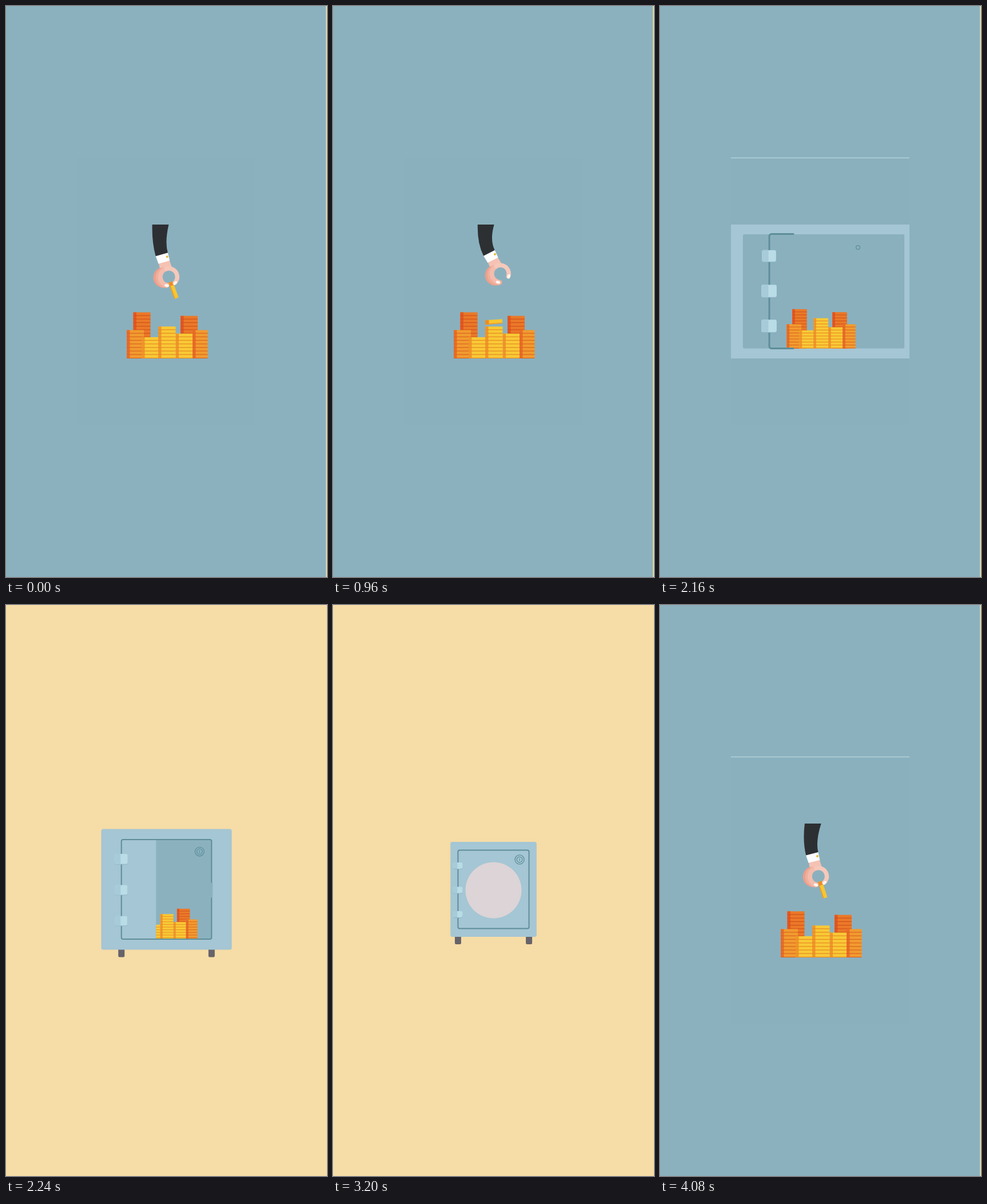
Animation, 561 px wide and 998 px high, one loop 4.16 s. Source, as an HTML page with a canvas:

```html
<!DOCTYPE html>
<html lang="en">
<head>
<meta charset="utf-8">
<title>Savings</title>
<style>
html, body { margin: 0; width: 100%; height: 100%; overflow: hidden; background: #8bb1bf; }
canvas { display: block; width: 561px; height: 998px; }
</style>
</head>
<body>
<canvas id="stage" width="561" height="998"></canvas>
<script>
const c = document.getElementById('stage').getContext('2d');
const LOOP = 4160, STEP = 80, TAU = Math.PI * 2, RAD = Math.PI / 180;
const BLUE = '#8bb1bf', SAND = '#f6dca6', STEEL = '#a5c6d4', EDGE = '#5d8e99';
const CX = 280.5, CY = 498.5, ROW = 6.2, FLOOR = 616;
const BOX = [124, 382, 312, 234];

// moments of the story, in ms
const RELEASE = 560, LAND = 760, REST = 1040, CLOSE = 2160, RETURN = 3400, REFILL = 3760;

const mix = (a, b, p) => a + (b - a) * p;
const ramp = (t, from, to) => Math.min(1, Math.max(0, (t - from) / (to - from)));
const smooth = p => p * p * (3 - 2 * p);
const outQuad = p => 1 - (1 - p) ** 2;
const outBack = p => 1 + 2.7 * (p - 1) ** 3 + 1.7 * (p - 1) ** 2;
// 1 when the safe starts to close, fading to 0 as it settles
const unsettled = t => Math.exp(-Math.max(0, t - CLOSE) / 165);

function rect(x, y, w, h, fill) {
  c.fillStyle = fill;
  c.fillRect(x, y, w, h);
}
function round(x, y, w, h, r, fill) {
  c.fillStyle = fill;
  c.beginPath();
  c.roundRect(x, y, w, h, r);
  c.fill();
}
function poly(points, fill) {
  c.fillStyle = fill;
  c.beginPath();
  points.forEach(p => c.lineTo(p[0], p[1]));
  c.fill();
}
function disc(x, y, r, fill) {
  c.fillStyle = fill;
  c.beginPath();
  c.arc(x, y, r, 0, TAU);
  c.fill();
}
function curve(color, width, draw) {
  c.strokeStyle = color;
  c.lineWidth = width;
  c.lineCap = c.lineJoin = 'round';
  c.beginPath();
  draw();
  c.stroke();
}
const arc = (x, y, r, from, to, color, width) =>
  curve(color, width, () => c.arc(x, y, r, from * RAD, to * RAD));

function group(draw) {
  c.save();
  draw();
  c.restore();
}
function clip(x, y, w, h) {
  c.beginPath();
  c.rect(x, y, w, h);
  c.clip();
}
function zoom(k) {
  c.translate(CX, CY);
  c.scale(k, k);
  c.translate(-CX, -CY);
}

function stack(x, w, rows, [main, side, line]) {
  const h = rows * ROW;
  rect(x, FLOOR - h, w, h, main);
  rect(x, FLOOR - h, 5.5, h, side);
  for (let i = 0; i < rows; i++) rect(x, FLOOR - i * ROW - 1.2, w, 1.2, line);
}
function stacks(extra) {
  const deep = ['#ea7928', '#e5551f', '#d4501d'];
  const warm = ['#f19b2f', '#e96c27', '#dc6420'];
  const gold = ['#f8c935', '#f0962a', '#e88925'];
  stack(222.5, 30, 13, deep);
  stack(305, 30, 12, deep);
  stack(211, 30, 8, warm);
  stack(237, 29, 6, gold);
  stack(296.5, 30, 7, gold);
  stack(326, 26.5, 8, warm);
  stack(266, 30.5, 9 + extra, gold);
}
function coin(x, y, angle) {
  group(() => {
    c.translate(x, y);
    c.rotate(angle * RAD);
    rect(-15, -3.8, 30, 7.6, '#f8c62f');
    rect(-15, -3.8, 6.5, 7.6, '#ee8b25');
    rect(-15, 2.4, 30, 1.4, '#ec9427');
  });
}
function fallingCoin(t) {
  const p = ramp(t, RELEASE, LAND);
  const hop = Math.sin(Math.PI * ramp(t, LAND, REST));
  coin(mix(290, 281, p), mix(499, 556, p * p) - 5 * hop, 75 * (1 - p) - 5 * hop);
}

function hand(open, holding) {
  const thumb = 60 - 15 * open, tip = 119 + 13 * open;
  if (holding) coin(2.7, 65.5, 86);
  poly([[-9, 12], [10, 12], [11, 29], [-11, 31]], '#f5c2b3');
  arc(-8, 39.5, 13.5, 95, 262, '#ec9f8b', 9);
  arc(-3.5, 40.5, 14, 105, 265, '#f0ae9c', 9);
  arc(1, 41, 14.8, tip, 270, '#f4bcac', 7.8);
  arc(1, 41, 14.8, -90, thumb, '#f6c8ba', 7.5);
  [thumb, tip].forEach(a => {
    c.fillStyle = '#fff5f0';
    c.beginPath();
    c.ellipse(1 + 15.5 * Math.cos(a * RAD), 41 + 15.5 * Math.sin(a * RAD), 4, 2.5, (a + 90) * RAD, 0, TAU);
    c.fill();
  });
  poly([[-11, -0.5], [11, -0.5], [10.5, 14], [-10, 14]], '#fff');
  disc(8, 6.4, 2, '#e6bd38');
}

// the arm swings on its angle; drift moves it sideways, lift takes it out of view
function swing(t) {
  if (t < CLOSE) {
    const sway = Math.sin(Math.PI * ramp(t, 160, RELEASE));
    const p = ramp(t, 520, 880), flick = p + 0.6 * Math.sin(Math.PI * p);
    const leave = ramp(t, 960, 1340) ** 2;
    return {
      angle: 16 - 3 * sway + 11 * flick + 65 * leave,
      drift: 3 - 7 * sway - 7 * flick + 4 * leave,
      lift: 90 * leave ** 3,
      open: ramp(t, RELEASE - STEP, RELEASE + STEP)
    };
  }
  const away = 1 - ramp(t, 3440, 4060), settle = ramp(t, 4080, LOOP);
  return {
    angle: 14 + 80 * away ** 2 + 2 * settle,
    drift: -2 + 4 * away + 5 * settle,
    lift: 80 * away ** 8,
    open: 0
  };
}
function arm(t) {
  const { angle, drift, lift, open } = swing(t);
  const x = 258 + 0.7 * angle + drift, y = 438 - 0.23 * angle - lift;
  const shoulder = 253 + 0.07 * angle + drift / 2;
  const dx = Math.sin(angle * RAD), dy = Math.cos(angle * RAD);
  const edge = s => [x + s * 11 * dy, y - s * 11 * dx];
  const bend = ([px, py], d) => [px - d * dx, py - d * dy];
  const l = edge(-1), r = edge(1);
  group(() => {
    c.translate(x, y);
    c.rotate(-angle * RAD);
    hand(open, t < RELEASE || t > CLOSE);
  });
  c.fillStyle = '#2d3033';
  c.beginPath();
  c.moveTo(shoulder, 381);
  c.quadraticCurveTo(...bend(l, 25), ...l);
  c.lineTo(...r);
  c.quadraticCurveTo(...bend(r, 20), shoulder + 29, 381);
  c.fill();
}

function hinges(t, s) {
  for (let i = 0; i < 3; i++) {
    const start = 2070 - 33 * i;
    if (t <= start) continue;
    const k = outBack(ramp(t, start, start + 240));
    const w = 17 * s * k, h = (11 * s + 4 * unsettled(t)) * k;
    const x = CX - 62.5 * s - w / 2, y = 498 + 42.5 * (i - 1) * s - h / 2;
    round(x, y + 1, w, h, 3, '#8fb6c4');
    round(x, y, w, h, 3, '#b9dce7');
    round(x, y, w * 0.46, h, [3, 0, 0, 3], '#a8cbd9');
  }
}
function lock(t, s) {
  const p = ramp(t, 2125, 2625);
  if (!p) return;
  const x = CX + 45.5 * s, y = 497 - 52 * s, r = 8 * s * outBack(p);
  arc(x, y, r, 0, 360, EDGE, 1.3);
  if (t <= CLOSE) return;
  arc(x, y, r * 0.6, 0, 360, EDGE, 1.3);
  curve(EDGE, 1.2, () => { c.moveTo(x, y - 1.8); c.lineTo(x, y + 1.8); });
}
function doorFrame(t) {
  const half = 100 * smooth(ramp(t, 1920, 2080)), reach = 42 * ramp(t, 2080, CLOSE);
  if (!half) return;
  curve(EDGE, 3, () => {
    c.moveTo(191 + reach, CY - half);
    c.arcTo(191, CY - half, 191, CY, reach && 4);
    c.arcTo(191, CY + half, 200, CY + half, reach && 4);
    c.lineTo(191 + reach, CY + half);
  });
}

function coinRoom(t) {
  const filled = t < CLOSE + STEP;
  group(() => {
    clip(...BOX);
    group(() => {
      zoom(filled ? mix(1, 0.85, smooth(ramp(t, 1240, 1800))) : 1);
      if (filled && t > 1240) {
        c.fillStyle = STEEL;
        c.beginPath();
        c.rect(0, 300, 561, 400);
        c.roundRect(121, 381.4, 332, 234.6, 3);
        c.fill('evenodd');
      }
      stacks(filled && t >= REST ? 1 : 0);
      if (t >= RELEASE && t < REST) fallingCoin(t);
    });
    if (t < 1360 || t > RETURN) arm(t);
    if (filled) {
      doorFrame(t);
      hinges(t, 1.44);
      lock(t, 1.44);
    } else if (Math.abs(t - 3680) < STEP) {
      curve('#fff', 1.6, () => {
        c.moveTo(302, 427);
        c.quadraticCurveTo(310, 421, 316, 412.5);
        c.moveTo(328, 423.5);
        c.lineTo(330, 420.5);
      });
    }
  });
}

function safe(t) {
  const e = unsettled(t), s = 1 + 0.44 * e;
  const half = 75.2 * s + 30 * e, top = 497 - 83 * s, h = 166 * s;
  [-62, 62].forEach(x => round(CX + x * s - 5.5, top + h - 3, 11, 16, 2.5, '#67636a'));
  round(CX - half, top, half * 2, h, 3.5, STEEL);

  const x = CX - 62 * s, y = 497 - 68.5 * s, dw = 124 * s, dh = 137 * s;
  const gap = dw * e;
  if (gap > 1) {
    group(() => {
      clip(x + dw - gap, y, gap, dh);
      rect(x, y, dw, dh, BLUE);
      zoom(0.85 * s / 1.44);
      stacks(1);
    });
  }
  curve(EDGE, 2, () => c.roundRect(x, y, dw, dh, 3));
  if (gap > 1) rect(x + dw - 2, CY - 13, 4, 26, BLUE);
  hinges(t, s);
  lock(t, s);
  disc(CX, CY, 49 * outQuad(ramp(t, 2400, 2960)), '#dcd4d6');
}

function blueStage(line) {
  rect(0, 0, 561, 998, BLUE);
  rect(124, 266, 312, 467, '#8ab0be');
  rect(559, 0, 2, 998, '#e3d9a6');
  if (line) rect(124, 264.8, 312, 1.4, '#b3d3d9');
}

function render(t) {
  if (t <= CLOSE || t >= REFILL) {
    blueStage(t >= 1920);
    coinRoom(t);
    return;
  }
  rect(0, 0, 561, 998, SAND);
  safe(t);
  if (t <= RETURN) return;
  group(() => {
    const left = mix(436, 110, outQuad(ramp(t, RETURN, RETURN + 384)));
    clip(...BOX);
    c.beginPath();
    c.arc(left + 496, CY, 496, 0, TAU);
    c.clip();
    rect(...BOX, BLUE);
    coinRoom(t);
  });
  // nothing of the safe stays once the room has swept past it
  if (t >= 3600) {
    rect(0, 0, 561, BOX[1], SAND);
    rect(0, BOX[1] + BOX[3], 561, 400, SAND);
  }
}

const start = performance.now();
function tick() {
  const now = (performance.now() - start) % LOOP;
  const t = Math.floor(now / STEP) * STEP;
  render(t < 240 ? 0 : t);
  requestAnimationFrame(tick);
}
tick();
</script>
</body>
</html>
```
